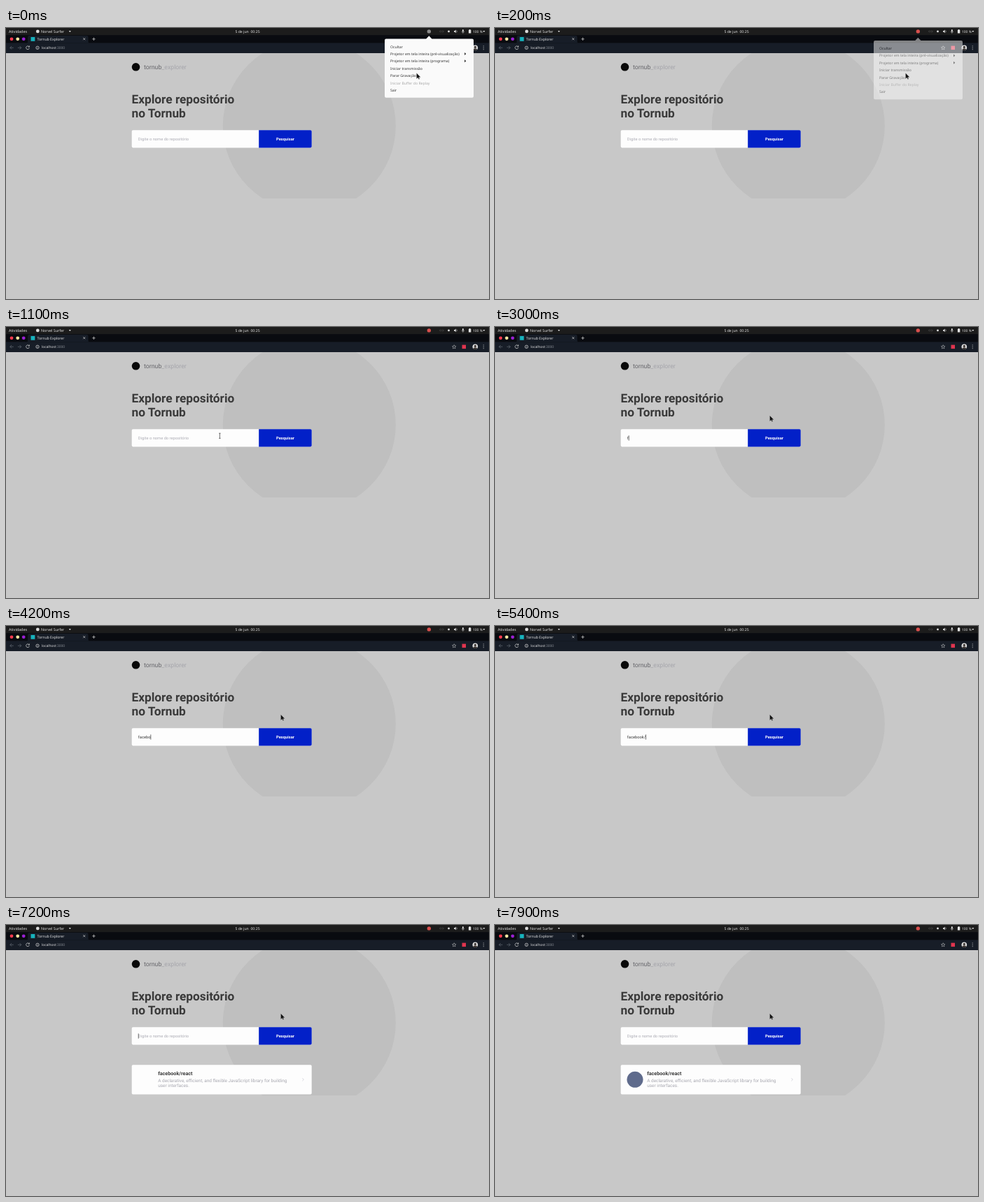
Animation of 690x388 px, one loop 8 s. Source, as an HTML page:

```html
<!DOCTYPE html>
<html lang="pt-BR">
<head>
<meta charset="utf-8">
<title>Tornub Explorer</title>
<style>
  html, body { margin: 0; width: 100%; height: 100%; overflow: hidden; background: #c8c8c8; }
  svg { display: block; width: 100vw; height: 100vh; text-rendering: geometricPrecision; }
  text { white-space: pre; }
  .ui { font: 5.15px "Noto Sans", "Open Sans", sans-serif; fill: #e4e4e4; }
  .page { font: 5.75px Roboto, Arial, sans-serif; fill: #3a3a3a; }
  .bold { font-weight: 700; }
  .line { fill: none; stroke: #ddd; stroke-width: .7; }
</style>
</head>
<body>
<svg viewBox="0 0 690 388" preserveAspectRatio="none">
  <defs>
    <clipPath id="backdrop"><path d="M300 36H570V244H300Z"/></clipPath>
    <clipPath id="face"><circle cx="670.3" cy="28.3" r="3.8"/></clipPath>
  </defs>

  <!-- Page -->
  <rect width="690" height="388" fill="#c8c8c8"/>
  <circle cx="433.3" cy="140" r="123.5" fill="#bfbfbf" clip-path="url(#backdrop)"/>
  <g class="page">
    <circle cx="185.5" cy="55.8" r="5.8" fill="#090909"/>
    <text x="197" y="58.7" font-size="8.76" style="font-size:8.76px;fill:#65656a">tornub<tspan fill="#a5a5ab">_explorer</tspan></text>
    <g class="bold" style="font-size:17.25px">
      <text x="179.6" y="107.5">Explore repositório</text>
      <text x="179.6" y="127.6">no Tornub</text>
    </g>
    <rect x="179.7" y="146.3" width="257" height="25.1" rx="1.8" fill="#fdfdfd"/>
    <path d="M361.2 146.3H434.9a1.8 1.8 0 0 1 1.8 1.8v21.5a1.8 1.8 0 0 1-1.8 1.8H361.2Z" fill="#0220c8"/>
    <text class="bold" x="399" y="161" text-anchor="middle" style="fill:#fff">Pesquisar</text>
    <text id="field" x="188.8" y="161"></text>
    <rect id="caret" y="155.4" width=".7" height="7.2" fill="#333"/>
    <g id="card">
      <rect x="179.7" y="200.2" width="257" height="42.3" rx="1.8" fill="#fdfdfd"/>
      <circle id="avatar" cx="200" cy="221.3" r="11.5" fill="#5f6b8c"/>
      <text class="bold" x="217.2" y="215.3" style="font-size:7.19px">facebook/react</text>
      <g style="font-size:6.47px;fill:#a8a8b0">
        <text x="217.2" y="224.9">A declarative, efficient, and flexible JavaScript library for building</text>
        <text x="217.2" y="232.4">user interfaces.</text>
      </g>
      <path class="line" d="M423.4 219.4l1.9 1.9-1.9 1.9" style="stroke:#c4c4ce"/>
    </g>
  </g>

  <!-- Browser -->
  <rect y="10" width="690" height="12" fill="#090b10"/>
  <rect y="21.4" width="690" height="14.6" fill="#171d27"/>
  <path d="M29 21.6q2.2 0 2.2-2.2V13q0-2 2-2H115.500q2 0 2 2v6.400q0 2.200 2.200 2.200Z" fill="#171d27"/>
  <circle cx="8" cy="15.8" r="2.4" fill="#ff3b4f"/>
  <circle cx="16.7" cy="15.8" r="2.4" fill="#f8e7a2"/>
  <circle cx="25.2" cy="15.8" r="2.4" fill="#9b20d4"/>
  <rect x="35.5" y="13" width="5.800" height="5.800" fill="#17b3bd"/>
  <g class="ui">
    <text x="44.500" y="17.700">Tornub Explorer</text>
    <text x="51" y="30.100" style="font-size:4.9px">localhost<tspan fill="#8b9097">:3000</tspan></text>
  </g>
  <g class="line">
    <path d="M110.200 14.200l3 3m0-3l-3 3M123.200 15.800h4.400m-2.200-2.200v4.400"/>
    <path d="M10.800 28.300H5.800m2.300-2.300l-2.300 2.300 2.300 2.300M16.800 28.300h5m-2.300-2.300l2.300 2.300-2.300 2.300" stroke="#666d76"/>
    <path d="M33 26.800a2.400 2.400 0 1 0 .4 2M33.400 25.400v1.800h-1.800"/>
    <circle cx="45" cy="28.300" r="2.200"/>
    <path d="M45 28v1.400M45 26.800v.5"/>
    <path d="M640.200 25.700l.8 1.700 1.900.2-1.400 1.300.4 1.900-1.700-.9-1.700.9.4-1.900-1.400-1.300 1.900-.2Z" stroke-width=".5"/>
  </g>
  <rect x="651.500" y="25.600" width="5.500" height="5.500" fill="#e0354f"/>
  <g clip-path="url(#face)">
    <rect x="666" y="24" width="9" height="9" fill="#dcdcdc"/>
    <circle cx="670.300" cy="27.300" r="1.600" fill="#39322f"/>
    <ellipse cx="670.300" cy="32" rx="3" ry="2.700" fill="#39322f"/>
  </g>
  <path d="M682.200 25.900v.1m0 2.300v.1m0 2.300v.1" stroke="#ddd" stroke-width="1" stroke-linecap="round"/>

  <!-- Desktop bar -->
  <rect width="690" height="10.200" fill="#1c1c1c"/>
  <g class="ui">
    <text x="4" y="6.700" style="font-size:5.35px">Atividades</text>
    <circle cx="45.300" cy="4.900" r="2.400" fill="#d8d8d8"/>
    <text x="50" y="6.700" style="font-size:5.3px">Norvel Surfer</text>
    <text x="345" y="6.700" text-anchor="middle">5 de jun  00:25</text>
    <text x="667" y="6.700" style="font-size:4.9px">100 %</text>
    <path d="M89.800 4h3l-1.500 2ZM681.300 4h3l-1.500 2Z"/>
    <circle id="tray" cx="604.300" cy="4.900" r="2.700"/>
    <circle cx="632.500" cy="4.900" r="1.400"/>
    <path d="M640 4h1.200l1.500-1.500v4.800L641.200 5.800H640Z"/>
    <rect x="651.900" y="2.100" width="1.800" height="3.500" rx=".9"/>
    <path d="M661.800 2h1.600v.7h.9v4.900h-3.400V2.700h.9Z"/>
    <g class="line">
      <path d="M621 3.400l-1.500 1.500 1.500 1.500m2.800-3l1.500 1.500-1.500 1.500m-2.300-1.500h1.900" stroke="#777" stroke-width=".5"/>
      <path d="M643.800 3.500q1 1.400 0 2.800M651.100 4.700q0 1.900 1.700 1.900t1.700-1.900m-1.700 1.900v1.200" stroke-width=".5"/>
    </g>
  </g>

  <g id="menu" class="ui">
    <path d="M543 15.500H600.200L604.300 11.200 608.400 15.500H666a2 2 0 0 1 2 2V97.800a2 2 0 0 1-2 2H543a2 2 0 0 1-2-2V17.500a2 2 0 0 1 2-2Z" fill="#fafafa"/>
    <path d="M655 34.900l2.300 2-2.300 2ZM655 45.300l2.300 2-2.300 2Z" fill="#333"/>
  </g>

  <path id="arrow" d="M0 0V8.300L2 6.600 3.200 9 4.400 8.400 3.300 6.100H5.800Z" fill="#111" stroke="#ddd" stroke-width=".25"/>
  <path id="beam" d="M-1.200-3.600H1.200M0-3.600V3.600M-1.200 3.600H1.200" stroke="#333" stroke-width=".7"/>
</svg>

<script>
const LOOP = 8000, STEP = 100;
const $ = id => document.getElementById(id);
const set = (id, attrs) => Object.entries(attrs).forEach(([k, v]) => $(id).setAttribute(k, v));
const show = (id, on) => { $(id).style.display = on ? '' : 'none'; };

const menuItems = ['Ocultar', 'Projetor em tela inteira (pré-visualização)',
  'Projetor em tela inteira (programa)', 'Iniciar transmissão', 'Parar Gravação',
  'Iniciar Buffer do Replay', 'Sair'];
menuItems.forEach((label, i) => {
  const item = document.createElementNS('http://www.w3.org/2000/svg', 'text');
  item.textContent = label;
  item.setAttribute('x', 549);
  item.setAttribute('y', 28.5 + i * 10.4);
  item.style.fill = i === 5 ? '#aaa' : '#333';
  $('menu').append(item);
});

const query = 'facebook/react';
const keyTimes = [3000, 3100, 3400, 3500, 4000, 4200, 4400, 4700, 5200, 5800, 6000, 6200, 6400, 6700];
const FOCUS = 1400, RESULT = 7200;

// Pointer stops: time, x, y
const stops = [[200, 586.5, 64.5], [800, 309, 132.5], [900, 309, 132.5], [1100, 305.4, 155.8],
  [1300, 305.4, 155.8], [1600, 392.5, 126.7]];

function pointerAt(t) {
  const next = stops.findIndex(s => s[0] > t);
  if (next === 0) return stops[0].slice(1);
  if (next < 0) return stops.at(-1).slice(1);
  const [a, b] = [stops[next - 1], stops[next]];
  const p = (t - a[0]) / (b[0] - a[0]);
  const eased = p * p * (3 - 2 * p);
  return [1, 2].map(i => a[i] + (b[i] - a[i]) * eased);
}

function drawField(t) {
  const done = t >= RESULT;
  const typed = done ? 0 : keyTimes.filter(k => k <= t).length;
  const field = $('field');
  field.textContent = typed ? query.slice(0, typed) : 'Digite o nome do repositório';
  field.style.fill = typed ? '#3a3a3a' : '#adadb5';

  // Every edit restarts the blink
  const lastEdit = done ? RESULT : typed ? keyTimes[typed - 1] : FOCUS;
  const phase = (t - lastEdit) % 1100;
  show('caret', t >= FOCUS && phase < (done ? 600 : 500));
  set('caret', { x: 188.8 + (typed ? field.getComputedTextLength() : 0) });
}

function draw(t) {
  const fade = Math.min(1, Math.max(0, (t - 80) / 240));
  set('menu', { opacity: 1 - fade, transform: `translate(0 ${fade * 5})` });
  set('tray', { fill: t < 100 ? '#8c8c8c' : '#d9504e' });

  const [x, y] = pointerAt(t);
  const overField = y > 146 && x > 180 && x < 361;
  show('arrow', !overField);
  show('beam', overField);
  set(overField ? 'beam' : 'arrow', { transform: `translate(${x} ${y})` });

  drawField(t);
  show('card', t >= RESULT);
  show('avatar', t >= 7500);
}

const start = performance.now();
function tick() {
  const t = (performance.now() - start) % LOOP;
  draw(Math.floor(t / STEP) * STEP);
  requestAnimationFrame(tick);
}
tick();
</script>
</body>
</html>
```
